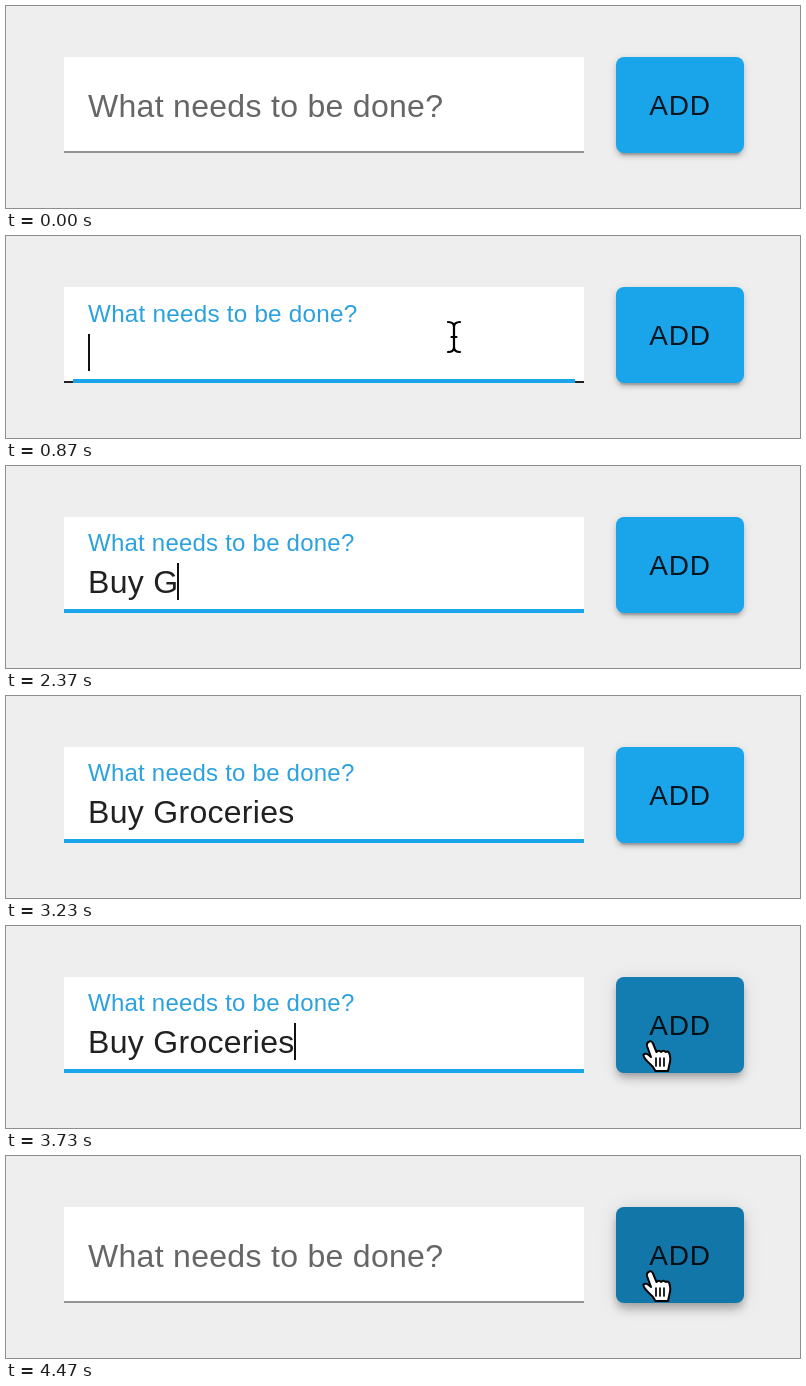
An HTML page for the animation above (4600 ms loop, 794x202 px).

```html
<!DOCTYPE html>
<html lang="en">
<head>
<meta charset="utf-8">
<title>Add a task</title>
<style>
  :root { --blue: #1aa5eb; --ease: cubic-bezier(.4, 0, .2, 1); }
  html, body { margin: 0; width: 100%; height: 100%; overflow: hidden; background: #eee; }
  #stage { position: relative; width: 794px; height: 202px; overflow: hidden; background: #eee; }
  #stage *, #button::before { animation: 4600ms linear infinite; }
  #field, #button, #rule, #focus, svg { position: absolute; }

  #field { left: 58px; top: 51px; width: 520px; height: 96px; background: #fff; }
  #stage #rule { inset: auto 0 0; height: 2px; background: rgba(0, 0, 0, .42); animation-name: rule; animation-timing-function: step-end; }
  #stage #focus { inset: auto 0 0; height: 4px; background: var(--blue); animation-name: focus; }
  @keyframes rule {
    0% { background: rgba(0, 0, 0, .42); }
    10.65% { background: rgba(0, 0, 0, .87); }
    78.3%, 100% { background: rgba(0, 0, 0, .42); }
  }
  @keyframes focus {
    0% { transform: scaleX(0); opacity: 1; }
    15.93% { transform: scaleX(0); animation-timing-function: var(--ease); }
    19.85% { transform: scaleX(1); }
    83.26% { transform: scaleX(1); opacity: 1; animation-timing-function: var(--ease); }
    86.96%, 100% { transform: scaleX(1); opacity: 0; }
  }

  #stage #button { left: 610px; top: 51px; width: 128px; height: 96px; border-radius: 8px; background: var(--blue); animation-name: lift; }
  #button::before { content: ""; position: absolute; inset: 0; border-radius: inherit; background: #000; animation-name: shade; }
  @keyframes lift {
    0%, 79.13% { box-shadow: 0 6px 2px -4px rgba(0,0,0,.2), 0 4px 4px rgba(0,0,0,.14), 0 2px 10px rgba(0,0,0,.12); animation-timing-function: var(--ease); }
    84%, 100% { box-shadow: 0 4px 8px -2px rgba(0,0,0,.2), 0 8px 10px rgba(0,0,0,.14), 0 2px 20px rgba(0,0,0,.12); }
  }
  @keyframes shade {
    0%, 79.13% { opacity: 0; }
    80.5%, 83.26% { opacity: .25; }
    85.2%, 87.6% { opacity: .35; }
    90.6%, 100% { opacity: .285; }
  }

  svg { left: 0; top: 0; }
  text { font: 32px "Liberation Sans", Arial, sans-serif; letter-spacing: .3px; font-kerning: none; white-space: pre; fill: #212121; }
  #stage .add { font-size: 28px; letter-spacing: .8px; fill: rgba(0, 0, 0, .87); }
  #stage #label { animation-name: float, tint; animation-timing-function: linear, step-end; }
  @keyframes float {
    0%, 15.93% { transform: translate(82px, 111px); animation-timing-function: var(--ease); }
    19.85% { transform: translate(82px, 85px) scale(.75); }
    86.74% { transform: translate(82px, 85px) scale(.75); animation-timing-function: var(--ease); }
    90.22%, 100% { transform: translate(82px, 111px); }
  }
  @keyframes tint {
    0% { fill: #666; }
    16.3% { fill: #2ba2de; }
    83.26%, 100% { fill: #666; }
  }

  #stage #cursor { animation-name: move; }
  @keyframes move {
    0%, 8.6% { transform: translate(478px, -14px); }
    10.22% { transform: translate(460px, 52px); animation-timing-function: ease-out; }
    12.39%, 76.09% { transform: translate(448px, 101px); }
    78.26% { transform: translate(580px, 108px); }
    79.13% { transform: translate(612px, 111px); animation-timing-function: ease-out; }
    81.09%, 100% { transform: translate(644px, 115px); }
  }
  #stage .shape { animation-timing-function: step-end; stroke-linejoin: round; stroke-linecap: round; }
  #stage .arrow { animation-name: arrow; }
  #stage .beam { animation-name: beam; fill: none; }
  #stage .hand { animation-name: hand; }
  @keyframes arrow {
    0% { opacity: 0; }
    8.6% { opacity: 1; }
    10.22% { opacity: 0; }
    78.2% { opacity: 1; }
    79.1%, 100% { opacity: 0; }
  }
  @keyframes beam {
    0% { opacity: 0; }
    10.22% { opacity: 1; }
    36.95% { opacity: 0; }
    76.08% { opacity: 1; }
    78.2%, 100% { opacity: 0; }
  }
  @keyframes hand {
    0% { opacity: 0; }
    79.1%, 100% { opacity: 1; }
  }
  #stage #caret { animation-name: blink; animation-timing-function: step-end; }
  @keyframes blink {
    0% { opacity: 0; }
    16.7% { opacity: 1; }
    31.08% { opacity: 0; }
    36.95% { opacity: 1; }
    70.21% { opacity: 0; }
    81.08% { opacity: 1; }
    83.26%, 100% { opacity: 0; }
  }
</style>
</head>
<body>
<div id="stage">
  <div id="field"><div id="rule"></div><div id="focus"></div></div>
  <div id="button"></div>
  <svg width="794" height="202">
    <defs>
      <path id="beam" d="M-6 -15 Q0 -15 0 -10 Q0 -15 6 -15 M0 -10 V10 M-6 15 Q0 15 0 10 Q0 15 6 15 M-2.5 0 H2.5"/>
    </defs>
    <text id="label">What needs to be done?</text>
    <text id="typed" x="82" y="127"></text>
    <rect id="caret" x="82" y="98" width="2" height="37" fill="#111"/>
    <text class="add" x="643.2" y="109">ADD</text>
    <g id="cursor">
      <path class="shape arrow" d="M0 0 V27 L6 21.5 L10 31 L14.5 29 L10.5 20 H19 Z" fill="#000" stroke="#fff" stroke-width="2"/>
      <g class="shape beam">
        <use href="#beam" stroke="#fff" stroke-width="4"/>
        <use href="#beam" stroke="#000" stroke-width="2.2"/>
      </g>
      <g class="shape hand" stroke="#000" stroke-width="2">
        <path fill="#fff" d="M-1.5 1 Q1.5 -1 3 2.5 L6.5 11 Q9 8.5 11 11 Q13.5 8.5 15.5 11 Q18.5 9.5 19.5 13 Q21 18 19.5 23 L18 30 H5.5 Q3 25 -2 21 Q-7 16 -6.5 13.5 Q-4 11 1 16 L-3 5 Q-3.5 2 -1.5 1 Z"/>
        <path fill="none" stroke-width="1.7" d="M6 17 V25 M10 17 V25 M14 17 V25"/>
      </g>
    </g>
  </svg>
</div>
<script>
  const phrase = "Buy Groceries";
  const keyTimes = [1730, 1830, 1900, 2030, 2230, 2370, 2430, 2530, 2670, 2730, 2770, 2830, 2900];
  const clearTime = 3970;
  const typed = document.getElementById("typed");
  const caret = document.getElementById("caret");
  const clock = caret.getAnimations()[0];

  function render() {
    const time = (clock.currentTime || 0) % 4600;
    const count = time < clearTime ? keyTimes.filter(key => key <= time).length : 0;
    typed.textContent = phrase.slice(0, count);
    const width = count ? typed.getComputedTextLength() : 0;
    caret.setAttribute("x", Math.max(82, Math.floor(81.5 + width)));
    caret.setAttribute("y", count ? 97 : 98);
    requestAnimationFrame(render);
  }
  render();
</script>
</body>
</html>
```
